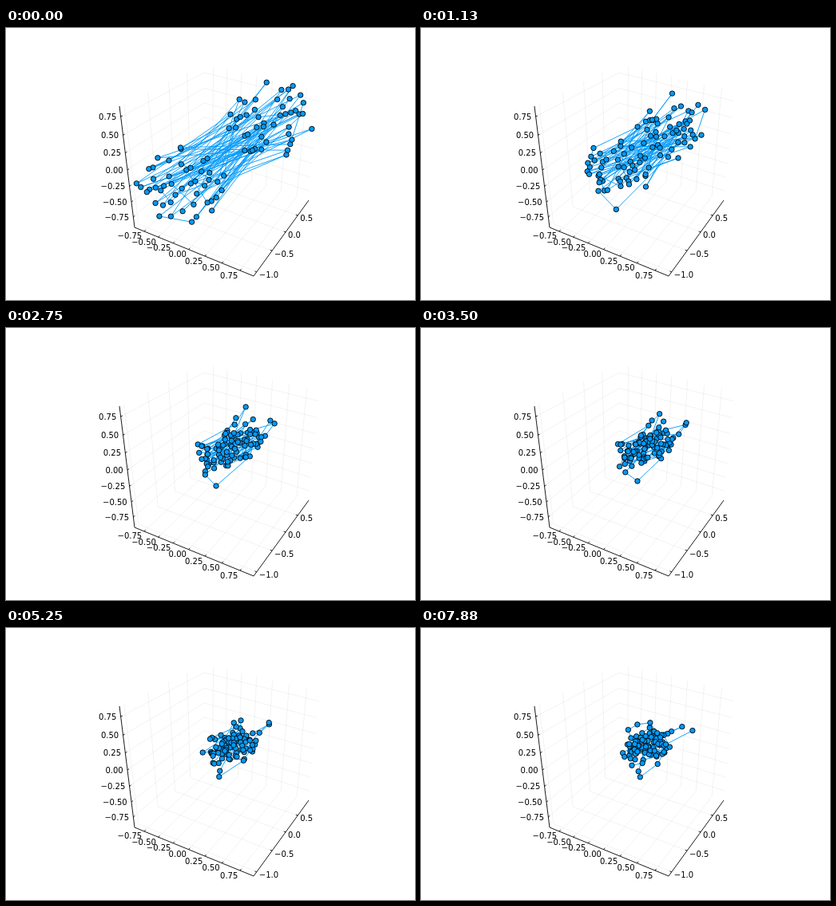
Animation of 512 by 341 pixels, one loop 8000 ms. Source, as an HTML page with a canvas:

```html
<!DOCTYPE html>
<html lang="en">
<head>
<meta charset="utf-8">
<title>Relaxing chain</title>
<style>
  html, body { margin: 0; width: 100%; height: 100%; overflow: hidden; background: #fff; }
  svg, canvas { position: absolute; left: 0; top: 0; width: 512px; height: 341px; }
  text { font: 10px "DejaVu Sans", sans-serif; fill: #000; }
  .end { text-anchor: end; }
  .axis { stroke: #000; stroke-width: .9; fill: none; }
  .grid { stroke: #000; stroke-opacity: .08; stroke-width: .7; fill: none; }
</style>
</head>
<body>
<svg id="plot" viewBox="0 0 512 341"></svg>
<canvas id="chain" width="512" height="341"></canvas>
<script>
const mix = (a, b, t) => a + (b - a) * t;
const along = (p, q, t) => [mix(p[0], q[0], t), mix(p[1], q[1], t)];
// Perspective: share of the edge on screen for a share u in space
const foreshorten = (u, depth) => u / (u + (1 - u) * depth);

// Box corners: floor, then the visible upper ones
const left = [161, 250], front = [310, 311], right = [379, 216], back = [248, 172];
const leftTop = [142, 98], backTop = [248, 45], rightTop = [393, 80];

function buildPlot() {
  let grid = '', axis = `M${leftTop}L${left}L${front}L${right}`, labels = '';

  // Ticks run along from..to; grid lines cross to the far edge and on to a third one
  function scale({ from, to, far, third, first, step, depth, count, value, digits, dx, dy, anchor }) {
    for (let i = 0; i < count; i++) {
      const t = foreshorten(first + step * i, depth);
      const p = along(from, to, t), q = along(...far, t), r = along(...third, t);
      grid += `M${p}L${q}L${r}`;
      axis += `M${p}L${along(p, q, 2.5 / Math.hypot(q[0] - p[0], q[1] - p[1]))}`;
      const text = value(i).toFixed(digits).replace('-', '\u2212');
      labels += `<text class="${anchor}" x="${p[0] + dx}" y="${p[1] + dy}">${text}</text>`;
    }
  }
  scale({
    from: left, to: front, far: [back, right], third: [backTop, rightTop],
    first: .0945, step: .1348, depth: 1.2, count: 7,
    value: i => -.75 + i * .25, digits: 2, dx: -2.7, dy: 9.6, anchor: 'end'
  });
  scale({
    from: front, to: right, far: [left, back], third: [leftTop, backTop],
    first: .0434, step: .238, depth: .78, count: 4,
    value: i => -1 + i * .5, digits: 1, dx: 3, dy: 7.4, anchor: 'start'
  });
  scale({
    from: leftTop, to: left, far: [backTop, back], third: [rightTop, right],
    first: .075, step: .1378, depth: .86, count: 7,
    value: i => .75 - i * .25, digits: 2, dx: -5.3, dy: 3.8, anchor: 'end'
  });

  document.getElementById('plot').innerHTML =
    `<path class="grid" d="${grid}"/><path class="axis" d="${axis}"/>${labels}`;
}

let seed = 41;
function rand() {
  seed = (seed + 0x6D2B79F5) | 0;
  let t = Math.imul(seed ^ (seed >>> 15), seed | 1);
  t ^= t + Math.imul(t ^ (t >>> 7), t | 61);
  return ((t ^ (t >>> 14)) >>> 0) / 4294967296;
}
const noise = () => (rand() + rand() + rand() - 1.5) * 2;

// Evenly filled, jittered ellipse in random order
function cluster(cx, cy, n = 46) {
  return Array.from({ length: n }, (_, i) => {
    const a = i * 2.4 + rand() * 1.5, r = Math.sqrt((i + rand()) / n);
    return { key: rand(), p: [cx + 55 * r * Math.cos(a), cy + 48 * r * Math.sin(a)] };
  }).sort((a, b) => a.key - b.key).map(o => o.p);
}

// The chain mostly jumps between the two clusters
function startChain() {
  const low = cluster(219, 197), high = cluster(330, 117);
  return low.flatMap((p, i) => rand() < .75 ? [p, high[i]] : [high[i], p]);
}

// Mean and spread of the cloud along each axis at step k
function shapeAt(k) {
  const e = Math.exp(-Math.pow(k / 13, 1.3));
  return [[mix(284, 275, e), mix(16.5, 62, e)], [mix(147, 157, e), mix(12.5, 47, e)]];
}

function measure(pts, c) {
  const mean = pts.reduce((s, p) => s + p[c], 0) / pts.length;
  const spread = Math.sqrt(pts.reduce((s, p) => s + (p[c] - mean) ** 2, 0) / pts.length);
  return [mean, spread];
}

// Noisy springs between neighbours
const PULL = .0125, JITTER = [1.7, 1.4], STEPS = 64;
function relax(pts) {
  return pts.map((p, i) => {
    const q = pts[i - 1] || p, r = pts[i + 1] || p;
    return p.map((v, c) => v + PULL * (q[c] + r[c] - 2 * v) + JITTER[c] * noise());
  });
}
function simulate() {
  let pts = startChain();
  return Array.from({ length: STEPS }, (_, k) => {
    if (k) pts = relax(pts);
    const goal = shapeAt(k), now = [measure(pts, 0), measure(pts, 1)];
    return pts.map(p => p.map((v, c) => goal[c][0] + (v - now[c][0]) * goal[c][1] / now[c][1]));
  });
}

buildPlot();
const poses = simulate();
const ctx = document.getElementById('chain').getContext('2d');

function draw(pts) {
  ctx.clearRect(0, 0, 512, 341);
  ctx.fillStyle = ctx.strokeStyle = '#009afa';
  ctx.lineWidth = .9;
  ctx.lineJoin = 'round';
  ctx.beginPath();
  pts.forEach(p => ctx.lineTo(p[0], p[1]));
  ctx.stroke();
  ctx.strokeStyle = '#000';
  for (const [x, y] of pts) {
    ctx.beginPath();
    ctx.arc(x, y, 3.2, 0, Math.PI * 2);
    ctx.fill();
    ctx.stroke();
  }
}

let shown = -1;
const begin = performance.now();
function tick() {
  const k = Math.floor((performance.now() - begin) % 8000 / 125);
  if (k !== shown) draw(poses[shown = k]);
  requestAnimationFrame(tick);
}
tick();
</script>
</body>
</html>
```
